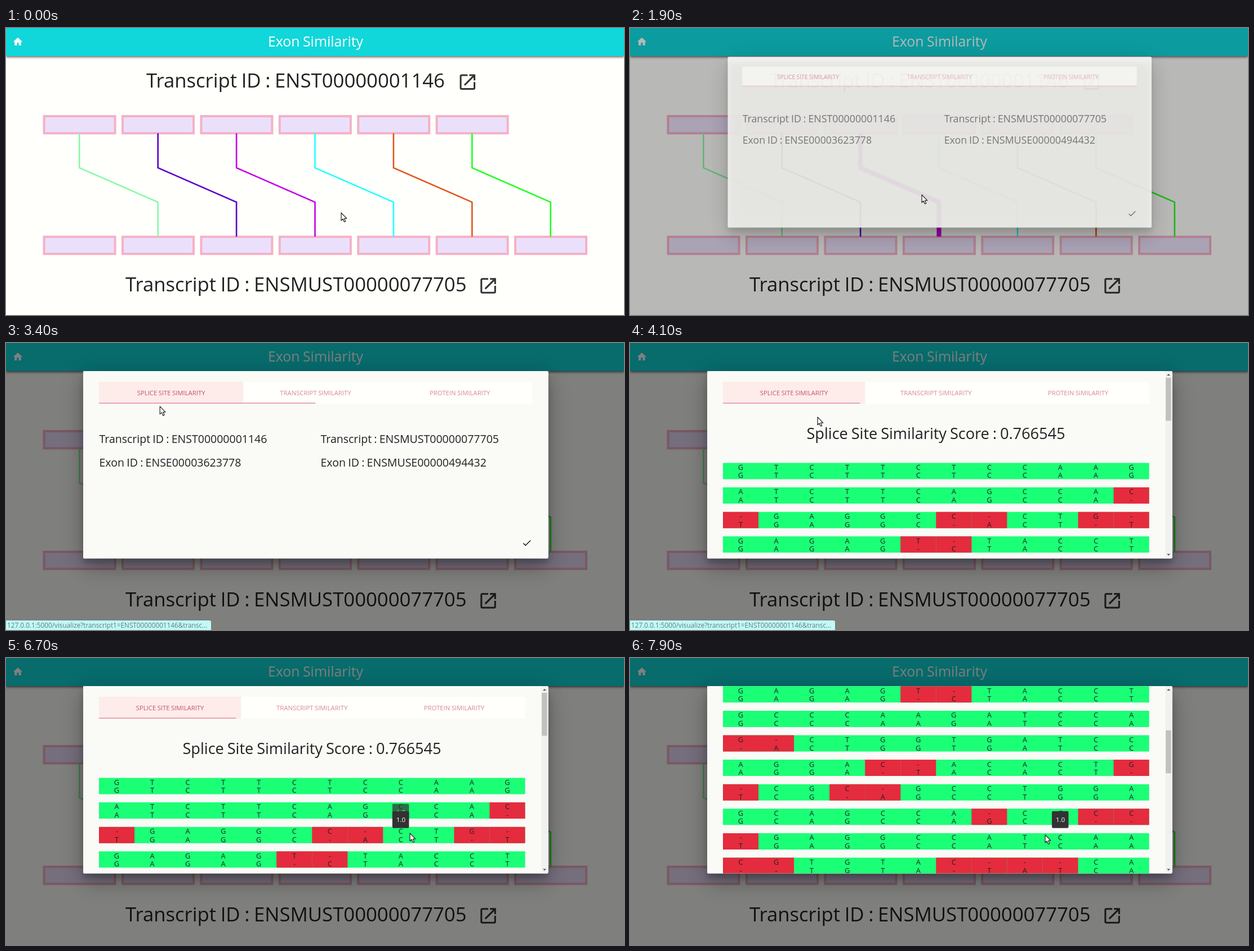
Recreate the animation shown at these times as an HTML page with a canvas. Size 1097 px wide and 511 px high, loop 8000 ms.

```html
<!DOCTYPE html>
<html lang="en">
<head>
<meta charset="utf-8">
<title>Exon Similarity</title>
<style>
html, body { margin: 0; width: 100%; height: 100%; overflow: hidden; background: #fffffc; }
canvas { display: block; }
</style>
</head>
<body>
<canvas id="stage" width="1097" height="511"></canvas>
<script>
const ctx = document.getElementById('stage').getContext('2d');
const W = 1097, H = 511, LOOP = 8000, STEP = 100;
const INK = '#212121', PAPER = '#fffffc', ROSE = '#d8869c';
const FONT = '"Open Sans", "Noto Sans", sans-serif';

// Alignment grid
const LEFT = 165, TOP = 213.4, CELL = 63.04, PITCH = 43.62, ROW = 29;

const icons = {
  open: 'M19 19H5V5h7V3H5c-1.11 0-2 .9-2 2v14c0 1.1.89 2 2 2h14c1.1 0 2-.9 2-2v-7h-2v7zM14 3v2h3.59l-9.83 9.83 1.41 1.41L19 6.41V10h2V3h-7z',
  home: 'M10 20v-6h4v6h5v-8h3L12 3 2 12h3v8z',
  done: 'M9 16.2L4.8 12l-1.4 1.4L9 19 21 7l-1.4-1.4L9 16.2z'
};
const arrow = new Path2D('M0 0V13.8L3.1 11 5.4 16.2 7.8 15.2 5.5 10.2H9.8Z');
const beam = new Path2D('M-3-6H3M-3 6H3M0-6V6');

const lineColors = ['#89f9a8', '#5c00c8', '#c400e6', '#22ffff', '#e0561c', '#22ff22'];

// Aligned sequences: upper strand / lower strand
const rows = `GTCTTCTCCAAG/GTCTTCTCCAAG ATCTTCAGCCAC/ATCTTCAGCCA- -GAGGCC-CTG-/TGAGGC-ACT-T
GAGAGT-TACCT/GAGAG-CTACCT GCCCAAGATCCA/GCCCAAGATCCA G-CTGGTGATCC/-ACTGGTGATCC
AGGAC-ACACTG/AGGA-TACACT- -CGC-GCCTGGA/TCG-AGCCTGGA GCAGCCA-CGCC/GCAGCCAGCG--
-GAGGCCATCAA/TGAGGCCATCAA CGTGTAC---CA/--TGTA-TATCA`.split(/\s+/).map(r => r.split('/'));

// Pointer moves: start, end, x, y
const moves = [
  [0, 500, 527, 292], [800, 1500, 518, 297], [2500, 2600, 513, 294], [2700, 3500, 239, 87],
  [3700, 4100, 333, 132], [4200, 5300, 582, 270], [5300, 6200, 654, 315], [6200, 6700, 717, 312],
  [6700, 7100, 737, 315]];

const ramp = (t, from, to) => Math.min(1, Math.max(0, (t - from) / (to - from)));
const easeOut = p => 1 - (1 - p) ** 2;
const mix = (a, b, p) => a + (b - a) * p;

const scrollAt = t => 85.7 * easeOut(ramp(t, 6900, 7300)) + 208.3 * ramp(t, 7600, 7900);

const pointerAt = t => moves.reduce(([x, y], [from, to, x2, y2]) => {
  const p = ramp(t, from, to);
  return [mix(x, x2, p), mix(y, y2, p)];
}, [595, 329]);

function text(str, x, y, size, color = INK, align = 'left', weight = 400) {
  ctx.font = `${weight} ${size}px ${FONT}`;
  ctx.wordSpacing = `${-size * .04}px`;
  ctx.textAlign = align;
  ctx.fillStyle = color;
  ctx.fillText(str, x, y);
}

function box(x, y, w, h, color, radius = 0) {
  ctx.fillStyle = color;
  ctx.beginPath();
  ctx.roundRect(x, y, w, h, radius);
  ctx.fill();
}

function icon(name, x, y, scale, color) {
  ctx.save();
  ctx.translate(x, y);
  ctx.scale(scale, scale);
  ctx.translate(-12, -12);
  ctx.fillStyle = color;
  ctx.fill(new Path2D(icons[name]));
  ctx.restore();
}

function shadow(y, blur, alpha) {
  ctx.shadowColor = `rgba(0,0,0,${alpha})`;
  ctx.shadowOffsetY = y;
  ctx.shadowBlur = blur;
}

function exon(i, y) {
  const x = 67.6 + 139.4 * i;
  box(x, y, 126, 30.4, '#ebe0fb');
  ctx.strokeStyle = '#f5b1c6';
  ctx.lineWidth = 4;
  ctx.strokeRect(x, y, 126, 30.4);
}

function link(i, color, width) {
  const x = 130.3 + 139.4 * i;
  ctx.strokeStyle = color;
  ctx.lineWidth = width;
  ctx.beginPath();
  ctx.moveTo(x, 187.5);
  ctx.lineTo(x, 249);
  ctx.lineTo(x + 139.4, 310);
  ctx.lineTo(x + 139.4, 371.5);
  ctx.stroke();
}

function page(t) {
  box(0, 0, W, H, PAPER);
  ctx.save();
  shadow(1.5, 4, .6);
  box(0, 0, W, 50, '#11d7da');
  ctx.restore();
  icon('home', 21, 24.5, .82, '#fff');
  text('Exon Similarity', 549.5, 32.5, 24.8, '#fff', 'center');
  text('Transcript ID : ENST00000001146', 249, 106, 34.7);
  text('Transcript ID : ENSMUST00000077705', 212, 468.5, 34.7);
  icon('open', 819.3, 96.3, 1.53, '#333');
  icon('open', 856, 459, 1.53, '#333');
  for (let i = 0; i < 7; i++) {
    if (i < 6) exon(i, 157);
    exon(i, 371.8);
  }
  const hover = ramp(t, 1200, 1500);
  lineColors.forEach((color, i) => link(i, color, i === 2 ? mix(2.6, 8.2, hover) : 2.6));
}

function tabs(t, width, loaded) {
  const third = width / 3;
  box(LEFT, 69, width, 39, PAPER);
  if (t >= 3300) box(LEFT, 69, third, 39, '#fdecea');
  ['SPLICE SITE', 'TRANSCRIPT', 'PROTEIN'].forEach((name, i) =>
    text(name + ' SIMILARITY', LEFT + third * (i + .5), 93, 11.3, i ? ROSE : '#c4506e', 'center', 500));
  const bar = loaded ? 243.5 : mix(width, third, easeOut(ramp(t, 3200, 3600)));
  box(LEFT, 106.2, bar, 1.8, '#e79aae');
}

function details() {
  text('Transcript ID : ENST00000001146', 165.5, 177.5, 19.5);
  text('Exon ID : ENSE00003623778', 165.5, 220, 19.5);
  text('Transcript : ENSMUST00000077705', 558.5, 177.5, 19.5);
  text('Exon ID : ENSMUSE00000494432', 558.5, 220, 19.5);
  icon('done', 924.5, 356, .8, '#222');
}

function alignment() {
  text('Splice Site Similarity Score : 0.766545', 543, 170.5, 27.1, INK, 'center');
  rows.forEach(([top, low], r) => {
    const y = TOP + PITCH * r;
    box(LEFT, y, CELL * 12, ROW, '#1bff76');
    for (let i = 0; i < 12; i++) {
      const x = LEFT + CELL * i;
      if (top[i] !== low[i]) box(x, y, CELL, ROW, '#e52b3e');
      text(top[i], x + CELL / 2, y + 12.4, 12.8, INK, 'center');
      text(low[i], x + CELL / 2, y + 27, 12.8, INK, 'center');
    }
  });
}

function scrollbar(scroll) {
  box(950, 50, 12, 333.5, '#f1f1f1');
  box(951, 62 + scroll * .227, 9.5, 76.5, '#c1c1c1');
  ctx.fillStyle = '#505050';
  for (const [y, d] of [[58, -3], [375.5, 3]]) {
    ctx.beginPath();
    ctx.moveTo(953, y);
    ctx.lineTo(959, y);
    ctx.lineTo(956, y + d);
    ctx.fill();
  }
}

function modal(t) {
  const open = easeOut(ramp(t, 1800, 2100)), loaded = t >= 3800;
  if (!open) return;
  box(0, 0, W, H, `rgba(0,0,0,${open * .5})`);
  ctx.save();
  ctx.globalAlpha = open;
  ctx.translate(549.5, 217 - (1 - open) * 30);
  ctx.scale(.8 + .2 * open, .8 + .2 * open);
  ctx.translate(-549.5, -217);
  for (const s of [[19, 34, .17], [7, 42, .17], [8, 10, .18]]) {
    shadow(...s);
    box(137, 50, 825.5, 333.5, '#fafaf7', 2);
  }
  ctx.shadowColor = 'transparent';
  ctx.clip();
  ctx.save();
  ctx.translate(0, -scrollAt(t));
  tabs(t, loaded ? CELL * 12 : 768.8, loaded);
  if (loaded) alignment();
  else details();
  ctx.restore();
  if (loaded) scrollbar(scrollAt(t));
  ctx.restore();
}

function tip(x, y, alpha) {
  ctx.globalAlpha = alpha;
  box(x - 15, y, 29.5, 30, '#323232', 2);
  text('1.0', x, y + 19, 11.6, '#fff', 'center');
  ctx.globalAlpha = 1;
}

// Score bubble above the cell under the pointer
function tooltip(t) {
  if (t < 5400) return;
  const [px, py] = pointerAt(t);
  const col = Math.floor((px - LEFT) / CELL), row = Math.floor((py - TOP) / PITCH);
  const x = LEFT + CELL * (col + .5), y = TOP + PITCH * row;
  if (py > y + ROW) return;
  if (!scrollAt(t)) tip(x, y - 41, .7);
  tip(x, y - 28, 1);
}

function statusBar(t) {
  if (t < 3100 || t >= 4500) return;
  box(0, 494, 364, 17, '#c2f9f7', [0, 3, 0, 0]);
  text('127.0.0.1:5000/visualize?transcript1=ENST00000001146&transc…', 2, 507, 11.76, '#5b7f7e');
}

function pointer(t) {
  ctx.save();
  ctx.translate(...pointerAt(t));
  ctx.lineJoin = 'round';
  if (t >= 2200 && t < 2900) {
    for (const [width, color] of [[3.4, '#222'], [1.1, '#fff']]) {
      ctx.lineWidth = width;
      ctx.strokeStyle = color;
      ctx.stroke(beam);
    }
  } else {
    ctx.fillStyle = '#fff';
    ctx.strokeStyle = '#222';
    ctx.lineWidth = 1.2;
    ctx.fill(arrow);
    ctx.stroke(arrow);
  }
  ctx.restore();
}

function draw(now) {
  const t = Math.floor(now % LOOP / STEP) * STEP;
  for (const layer of [page, modal, tooltip, statusBar, pointer]) layer(t);
  requestAnimationFrame(draw);
}
requestAnimationFrame(draw);
</script>
</body>
</html>
```
